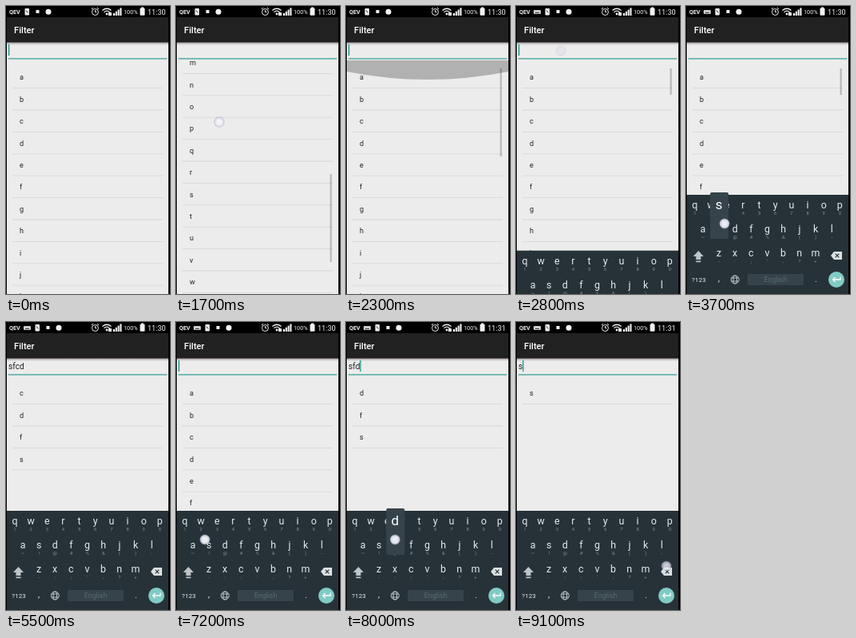
Write an HTML page with a canvas that moves like this. It is 205 px wide and 360 px high and loops after 9.2 s.

```html
<!DOCTYPE html>
<html lang="en">
<head>
<meta charset="utf-8">
<title>Filter</title>
<style>
html, body { margin: 0; width: 100%; height: 100%; overflow: hidden; background: #000; }
canvas { display: block; }
</style>
</head>
<body>
<canvas id="stage" width="205" height="360"></canvas>
<script>
const ctx = document.getElementById('stage').getContext('2d');
const LOOP = 9200, STEP = 100;
const ROW = 27.4, LIST_TOP = 68, KEY_TOP = 236;
const LETTERS = [...'abcdefghijklmnopqrstuvwxyz'];

// Keyboard rows: letters, hints, x of the first key, y of the letters
const ROWS = [
  ['qwertyuiop', '1234567890', 11, 249],
  ['asdfghjkl', '~!@#%&()-', 21, 279],
  ['zxcvbnm', '-:;\',?+', 41, 309]
];
const keys = { '<': { x: 188, y: 312 } };
ROWS.forEach(([row, hints, x, y]) => [...row].forEach((c, i) => {
  keys[c] = { x: x + i * 20.15, y, hint: hints[i] };
}));

// Key taps: time of the edit, key, finger x offset, finger lead time
const TAPS = [
  [3800, 's', 7, 300], [4000, 'f', 3], [4200, 'c', 2], [5000, 'd', 2],
  [6300, '<', 0, 400], [6500, '<', 0], [6700, '<', 0], [6900, '<', 0],
  [7400, 's', -5, 200], [7700, 'f', 0], [8000, 'd', 0],
  [8600, '<', 0, 200], [9000, '<', 0, 200]
].map(([time, key, dx, lead = 100]) => ({ time, key, dx, lead }));

const CURSOR_SHOWN = [-400, 800, 1900, 2800, ...TAPS.map(tap => tap.time)];
const SCROLL = [[400, 0], [900, 190], [1100, 310], [1400, 402], [1500, 402], [1700, 347], [2000, 202], [2200, 0]];

const clamp = v => Math.max(0, Math.min(1, v));
const ramp = (t, from, to) => clamp((t - from) / (to - from));

function track(points, t) {
  const next = points.findIndex(p => p[0] > t);
  if (next === 0) return points[0][1];
  if (next < 0) return points[points.length - 1][1];
  const [t0, v0] = points[next - 1], [t1, v1] = points[next];
  return v0 + (v1 - v0) * ramp(t, t0, t1);
}

function box(x, y, w, h, color, r = 0) {
  ctx.fillStyle = color;
  ctx.beginPath();
  ctx.roundRect(x, y, w, h, r);
  ctx.fill();
}

function disc(x, y, r, color) {
  ctx.fillStyle = color;
  ctx.beginPath();
  ctx.arc(x, y, r, 0, 7);
  ctx.fill();
}

function stroke(path, color, width = 1) {
  ctx.strokeStyle = color;
  ctx.lineWidth = width;
  ctx.stroke(new Path2D(path));
}

function shape(path, color) {
  ctx.fillStyle = color;
  ctx.fill(new Path2D(path));
}

function text(str, x, y, size, color, align = 'left', weight = 400) {
  ctx.font = `${weight} ${size}px Roboto, sans-serif`;
  ctx.textAlign = align;
  ctx.fillStyle = color;
  ctx.fillText(str, x, y);
}

function typedText(t) {
  return TAPS.filter(tap => tap.time <= t)
    .reduce((s, { key }) => key === '<' ? s.slice(0, -1) : s + key, '');
}

function drawStatus(t, hasKeys) {
  const white = '#f2f2f2';
  box(0, 0, 205, 14, '#000');
  text('QEV', 4, 10, 7.2, white, 'left', 700);
  let x = 26;
  if (hasKeys) {
    box(22, 5, 9, 5, '#ccc', 1);
    box(24, 8, 5, 1, '#333');
    x += 13;
  }
  box(x - 2.5, 3, 5.5, 8.5, white, 1);
  stroke(`M${x - 1} 5.5l2.5 3`, '#222');
  box(x + 11.5, 5, 4, 4, white);
  disc(x + 27, 7.3, 3.5, white);

  // Alarm, wireless, signal, battery
  stroke('M107.5 7.5a4 4 0 1 0 8 0a4 4 0 1 0 -8 0M111.5 5v2.7h2M107 4l2-2M116 4l-2-2', white);
  stroke('M120.5 5.5q5.5-4.5 11 0M122.5 7.7q3.5-3 7 0', white, 1.3);
  disc(126, 10, 1.4, white);
  box(128, 8, 4, 4, white, .5);
  for (let i = 0; i < 4; i++) box(134 + i * 2.8, 9 - i * 2.2, 2.1, 3 + i * 2.2, white);
  text('100%', 147, 10.3, 7.3, white);
  box(169, 1.5, 3, 2, white);
  box(167.5, 2.7, 6, 9, white, .7);
  text(t < 7800 ? '11:30' : '11:31', 177, 10.8, 9.1, white);
}

function drawHeader(t, value) {
  box(1, 14, 202, 31.5, '#212121');
  const shade = ctx.createLinearGradient(0, 45, 0, 49);
  shade.addColorStop(0, 'rgba(40,20,30,.4)');
  shade.addColorStop(1, 'rgba(40,20,30,0)');
  box(1, 45, 202, 4, shade);
  text('Filter', 10, 34, 11.2, '#fff', 'left', 500);

  box(3, 65.2, 198, 1.4, '#35a196');
  text(value, 3, 59, 10.2, '#222');
  if (CURSOR_SHOWN.some(at => t >= at && t < at + 500)) {
    box(3 + ctx.measureText(value).width, 48, 1.3, 14, '#159588');
  }
}

function drawGlow(t) {
  const size = t < 2300 ? ramp(t, 2100, 2300) : 1 - ramp(t, 2300, 2700);
  if (!size) return;
  const edge = LIST_TOP + 14 * size, bend = LIST_TOP + 34 * size;
  ctx.globalAlpha = size;
  shape(`M1 ${LIST_TOP}H203V${edge}Q102 ${bend} 1 ${edge}Z`, 'rgba(0,0,0,.25)');
  ctx.globalAlpha = 1;
}

function drawList(t, value, offset, hasKeys) {
  const items = value ? LETTERS.filter(c => value.includes(c)) : LETTERS;
  ctx.save();
  ctx.beginPath();
  ctx.rect(1, LIST_TOP, 202, 360 - LIST_TOP);
  ctx.clip();
  items.forEach((c, i) => {
    const y = 89 + i * ROW - offset;
    text(c, 17, y + 3.4, 9.1, '#222');
    box(8, y + 13.2, 188, .8, '#d5d5d5');
  });
  drawGlow(t);
  const fade = hasKeys ? (t < 3800 ? 1 : 0) : ramp(t, 400, 500) * (1 - ramp(t, 2500, 2700));
  box(192.5, 78 + offset * .38, 2.2, hasKeys ? 33 : 110, `rgba(0,0,0,${.22 * fade})`);
  ctx.restore();
}

function drawKeys(t) {
  const light = '#e6eaec', dim = '#84939a';
  ctx.save();
  ctx.translate(0, 124 * (1 - ramp(t, 2700, 3100)) ** 2);
  box(1, KEY_TOP, 202, 124, '#263238');
  for (const [c, { x, y, hint }] of Object.entries(keys)) {
    if (!hint) continue;
    text(c, x, y + 4, 12.4, light, 'center');
    text(hint, x, y + 12, 5.8, dim, 'center');
  }
  shape('M15.5 306l6.5 7h-3.5v4h-6v-4H9zM12.5 318.5h6v1.8h-6z', '#bdc5c9');
  shape('M181 312l4-5h10v10h-10z', '#dce1e3');
  stroke('M186.7 309.7l4.6 4.6M191.3 309.7l-4.6 4.6', '#263238', 1.2);

  text('?123', 16, 345, 8, light, 'center');
  text(',', 41, 344, 11, light, 'center');
  stroke('M56.3 342a5 5 0 1 0 10 0a5 5 0 1 0-10 0M59 342a2.3 5 0 1 0 4.6 0a2.3 5 0 1 0-4.6 0M57 340h8.6M57 344h8.6', '#cbd2d5', .9);
  box(77, 335, 70, 14, '#36434a', 1);
  text('English', 112, 345, 8.8, '#58676f', 'center');
  text('.', 162.5, 345, 11, light, 'center');
  disc(188, 342, 10, '#80cbc4');
  stroke('M193 338.5v3.5h-9.5M186.5 339l-3 3l3 3', '#fff', 1.3);
  ctx.restore();
}

function drawPreview({ key }) {
  const { x, y } = keys[key];
  if (key === '<') return box(x - 11, y - 14, 22, 28, 'rgba(255,255,255,.1)', 2);
  box(x - 11, y - 46, 23, 58, '#37434a', 2);
  text(key, x, y - 25, 17, '#fff', 'center');
}

function drawFinger(x, y, alpha = 1) {
  ctx.globalAlpha = alpha;
  disc(x, y, 6.5, 'rgba(165,170,195,.7)');
  disc(x, y, 5.6, 'rgba(245,246,252,.75)');
  disc(x, y, 3.5, 'rgba(255,255,255,.5)');
  ctx.globalAlpha = 1;
}

function drawTouches(t, offset) {
  if (t >= 100 && t <= 900) drawFinger(51.5, 300.5 - offset);
  if (t >= 1500 && t <= 2000) drawFinger(54, 492 - offset);
  if (t >= 2500 && t <= 2800) drawFinger(56, 56, 1 - ramp(t, 2600, 2900));

  const tap = TAPS.findLast(p => t >= p.time - p.lead && t < p.time + 300);
  if (!tap) return;
  if (t >= tap.time - 100 && t <= tap.time) drawPreview(tap);
  const { x, y } = keys[tap.key];
  drawFinger(x + tap.dx, y - 7, 1 - ramp(t, tap.time, tap.time + 300));
}

function draw(now) {
  const t = Math.floor(now % LOOP / STEP) * STEP;
  const value = typedText(t), offset = track(SCROLL, t), hasKeys = t >= 2800;
  box(0, 0, 205, 360, '#000');
  box(1, 14, 202, 346, '#ececec');
  drawList(t, value, offset, hasKeys);
  drawHeader(t, value);
  drawStatus(t, hasKeys);
  if (hasKeys) drawKeys(t);
  drawTouches(t, offset);
  requestAnimationFrame(draw);
}
requestAnimationFrame(draw);
</script>
</body>
</html>
```
